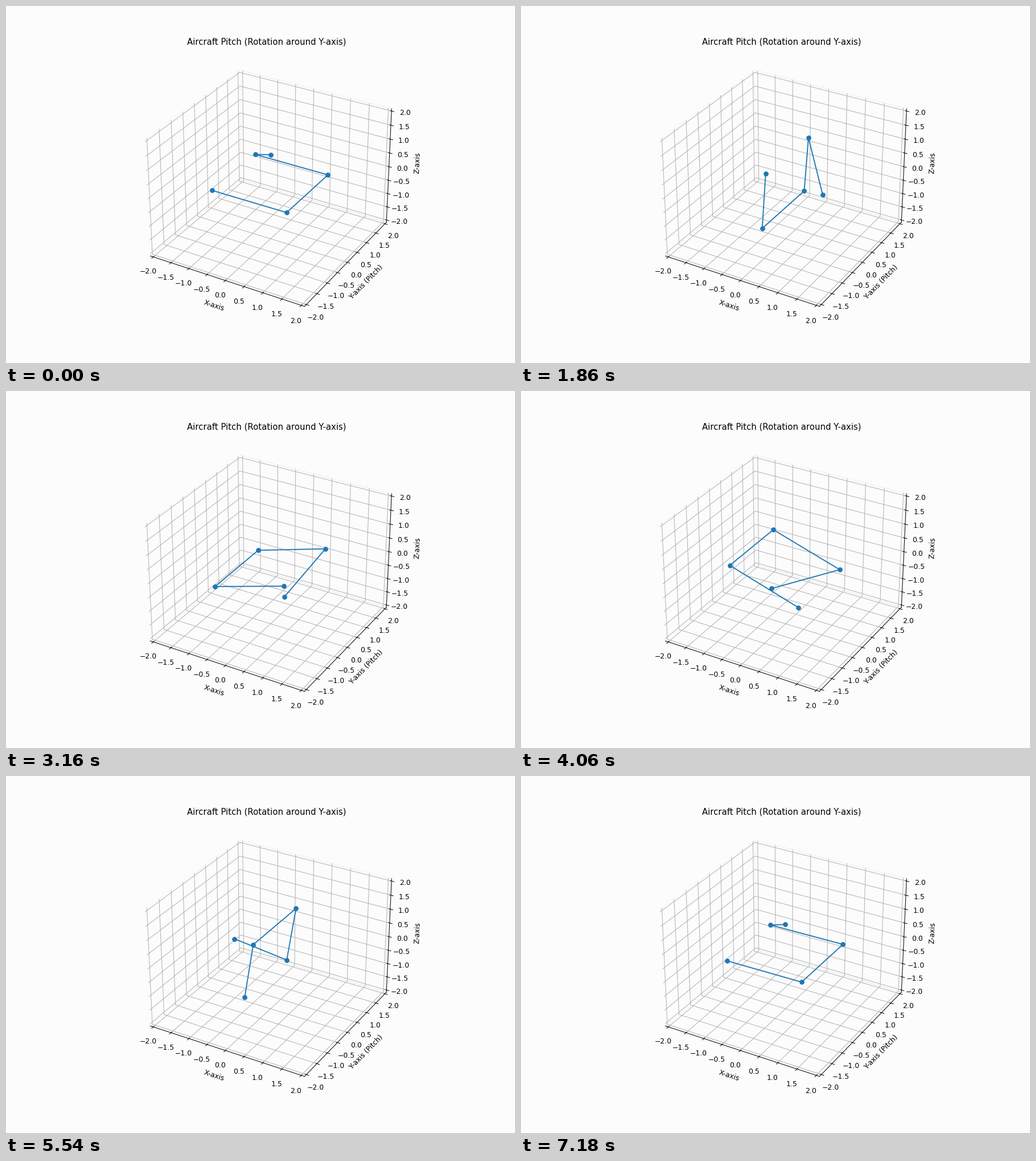
Recreate the animation shown at these times as a matplotlib script. Size 894 by 626 pixels, loop 7.2 s.

```python
import matplotlib.pyplot as plt
import numpy as np
from matplotlib.animation import FuncAnimation
from matplotlib.lines import Line2D
from matplotlib.transforms import IdentityTransform
from mpl_toolkits.mplot3d import proj3d

FRAMES, INTERVAL = 360, 20
BACK = "#fcfcfc"
LIMIT = 2 * 25 / 24  # small margin beyond the last tick

# Corners of the flat body, then the tip of the fin
BODY = np.array([[-1, -1, 0], [1, -1, 0], [1, 1, 0], [-1, 1, 0], [0, 0, 1]]).T

fig = plt.figure(figsize=(10, 7.0023), dpi=89.4, facecolor=BACK)
ax = fig.add_subplot(projection="3d", facecolor=BACK)
ax.set(xlim=(-LIMIT, LIMIT), ylim=(-LIMIT, LIMIT), zlim=(-LIMIT, LIMIT),
       xlabel="X-axis", ylabel="Y-axis (Pitch)", zlabel="Z-axis",
       title="Aircraft Pitch (Rotation around Y-axis)")
for axis in (ax.xaxis, ax.yaxis, ax.zaxis):
    axis.set_ticks(np.arange(-2, 2.1, 0.5))
    axis.pane.fill = False

# The axes never change: render them once and reuse the picture as backdrop
fig.canvas.draw()
backdrop = np.array(fig.canvas.buffer_rgba())
proj = ax.get_proj()
to_pixels = ax.transData.frozen()
ax.set_visible(False)
fig.figimage(backdrop, origin="upper")

line = Line2D([], [], color="tab:blue", marker="o",
              transform=IdentityTransform())
fig.add_artist(line)


def pitch(deg):
    c, s = np.cos(np.radians(deg)), np.sin(np.radians(deg))
    return np.array([[c, 0, s], [0, 1, 0], [-s, 0, c]])


def update(frame):
    x, y, _ = proj3d.proj_transform(*(pitch(frame) @ BODY), proj)
    line.set_data(*to_pixels.transform(np.column_stack([x, y])).T)
    return line,


anim = FuncAnimation(fig, update, frames=FRAMES, interval=INTERVAL,
                     repeat=True, repeat_delay=0)
plt.show()
```
